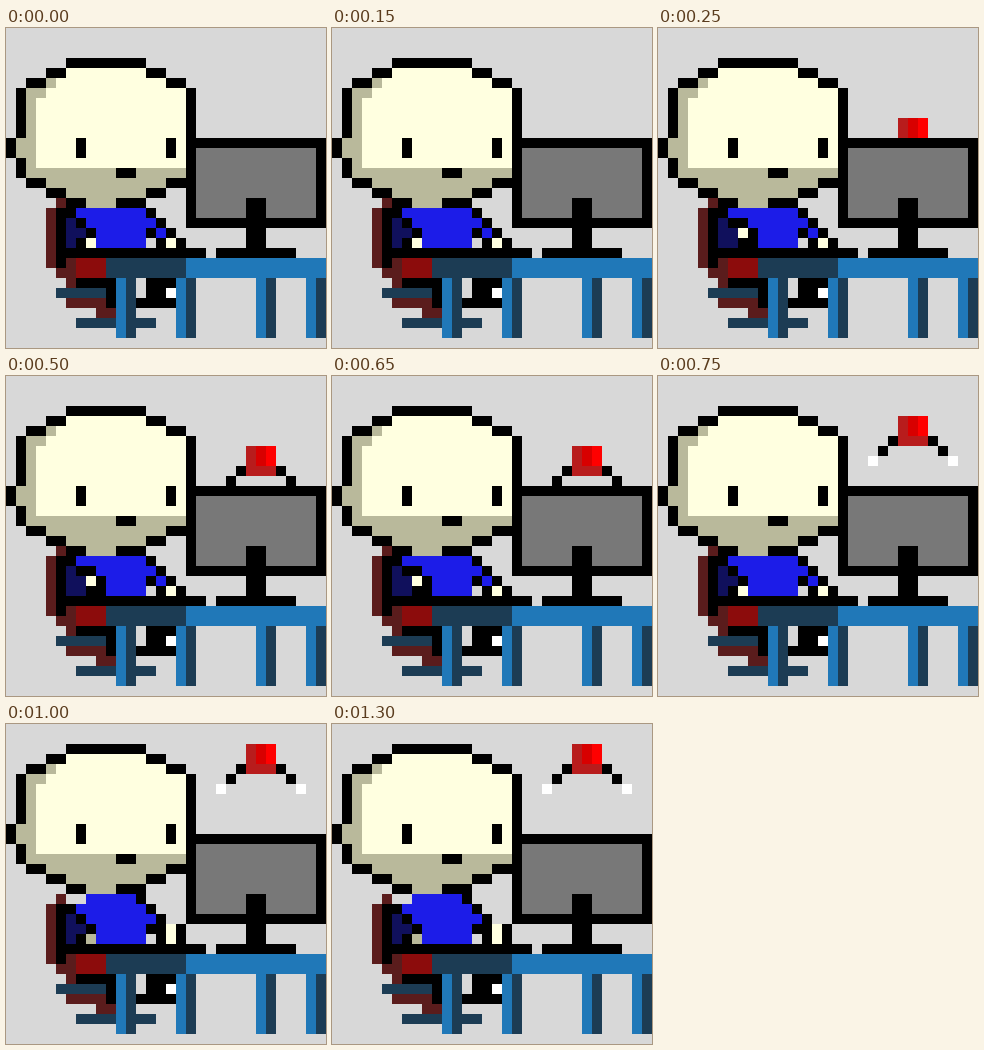
Recreate the animation shown at these times as an HTML page with a canvas. Size 320x320 px, loop 1500 ms.

```html
<!DOCTYPE html>
<html lang="en">
<head>
<meta charset="utf-8">
<title>Desk worker</title>
<style>
html, body { margin: 0; width: 100%; height: 100%; overflow: hidden; background: #d8d8d8; }
canvas { display: block; width: 320px; height: 320px; }
</style>
</head>
<body>
<canvas width="320" height="320"></canvas>
<script>
const ctx = document.querySelector('canvas').getContext('2d');
const CELL = 10, STEP = 250, LOOP = 1500;
const BG = '#d8d8d8', INK = '#000', CREAM = '#ffffe0', SHADE = '#b9b99b', WHITE = '#fff';
const BLUE = '#1c1ce8', NAVY = '#10105c', MAROON = '#5a1c1c', RED = '#8c0c0c';
const DESK = '#2078b8', DARK = '#1c3c54', GREY = '#787878';
const HOP = [11, 9, 7, 4, 2, 2];

// All coordinates are in cells of the 32 x 32 grid.
function box(color, x, y, w = 1, h = 1) {
  ctx.fillStyle = color;
  ctx.fillRect(x * CELL, y * CELL, w * CELL, h * CELL);
}

function chair() {
  box(MAROON, 4, 18, 1, 6);
  box(MAROON, 5, 17, 1, 8);
  box(INK, 5, 18, 1, 6);
  box(MAROON, 6, 23, 1, 5);
  box(RED, 7, 23, 3, 2);
  box(INK, 7, 25, 4);
  box(INK, 10, 25, 1, 3);
  box(MAROON, 6, 27, 4);
  box(MAROON, 9, 28, 2);
  box(DARK, 5, 26, 5);
  box(DARK, 7, 29, 8);
  box(INK, 13, 27, 4);
  box(INK, 14, 25, 3, 2);
  box(WHITE, 16, 26);
}

function desk() {
  box(DESK, 18, 23, 14, 2);
  box(DARK, 10, 23, 8, 2);
  for (const x of [11, 17, 25, 30]) {
    box(DESK, x, 25, 1, 6);
    box(DARK, x + 1, 25, 1, 6);
  }
  box(INK, 6, 22, 14);
}

function torso(lift, tap) {
  box(INK, 6, 18, 1, 4);
  box(BLUE, 7, 18, 7);
  box(BLUE, 7, 19, 8);
  box(BLUE, 8, 20, 6);
  box(BLUE, 9, 21, 5);
  box(INK, 14, 18);
  box(INK, 15, 19);
  box(NAVY, 6, 19);
  box(NAVY, 6, 20, 1, 2);

  if (tap) {
    box(NAVY, 6, 20, 2, 2);
    box(INK, 7, 19, 2);
    box(CREAM, 8, 20);
    box(INK, 9, 20, 1, 2);
    box(INK, 8, 21);
  } else {
    box(INK, 7, 19);
    box(NAVY, 7, 20);
    box(INK, 7, 21);
    box(lift ? SHADE : CREAM, 8, 21);
    box(INK, 8, 20);
  }

  if (lift) {
    box(BLUE, 8, 17, 5);
    box(BLUE, 14, 18);
    box(INK, 13, 17);
    box(INK, 14, 18);
    box(INK, 14, 20, 2);
    box(CREAM, 16, 20);
    box(INK, 17, 20);
    box(INK, 15, 21);
    box(CREAM, 16, 21);
    box(INK, 17, 21);
  } else {
    box(INK, 14, 20);
    box(BLUE, 15, 20);
    box(INK, 16, 20);
    box(INK, 15, 21);
    box(CREAM, 16, 21);
    box(INK, 17, 21);
  }
}

function head(y) {
  const at = (color, cx, cy, w, h) => box(color, cx, cy + y, w, h);
  at(SHADE, 1, 11, 1, 2);
  at(SHADE, 2, 6, 16, 9);
  at(SHADE, 4, 5, 12, 11);
  at(SHADE, 6, 16, 8);
  at(SHADE, 8, 17, 3);
  at(CREAM, 6, 4, 8);
  at(CREAM, 5, 5, 11);
  at(CREAM, 3, 6, 15, 8);
  at(SHADE, 3, 6);

  at(INK, 6, 3, 8);
  for (const [x, row] of [[4, 4], [14, 4], [2, 5], [16, 5], [2, 15], [16, 15], [4, 16], [14, 16], [6, 17]])
    at(INK, x, row, 2);
  at(INK, 11, 17, 3);
  at(INK, 1, 6, 1, 5);
  at(INK, 0, 11, 1, 2);
  at(INK, 1, 13, 1, 2);
  at(INK, 18, 6, 1, 9);
  at(INK, 7, 11, 1, 2);
  at(INK, 16, 11, 1, 2);
  at(INK, 11, 14, 2);
}

function jumper(y) {
  box('#b81c1c', 24, y, 3, 3);
  box('#d80000', 25, y, 2, 2);
  box('#ff0000', 26, y, 1, 2);
  for (const [left, right, row, color] of [[23, 27, 2, INK], [22, 28, 3, INK], [21, 29, 4, WHITE]]) {
    box(color, left, y + row);
    box(color, right, y + row);
  }
}

function monitor() {
  box(INK, 18, 11, 14, 9);
  box(GREY, 19, 12, 12, 7);
  box(INK, 24, 17, 2, 5);
  box(INK, 21, 22, 8);
}

function draw(now) {
  const step = Math.floor((now % LOOP) / STEP);
  const lift = step >= 4;
  box(BG, 0, 0, 32, 32);
  chair();
  torso(lift, step === 1 || step === 2);
  head(lift ? -1 : 0);
  desk();
  if (step > 0) jumper(HOP[step]);
  monitor();
}

let start;
function tick(now) {
  start ??= now;
  draw(now - start);
  requestAnimationFrame(tick);
}
draw(0);
requestAnimationFrame(tick);
</script>
</body>
</html>
```
